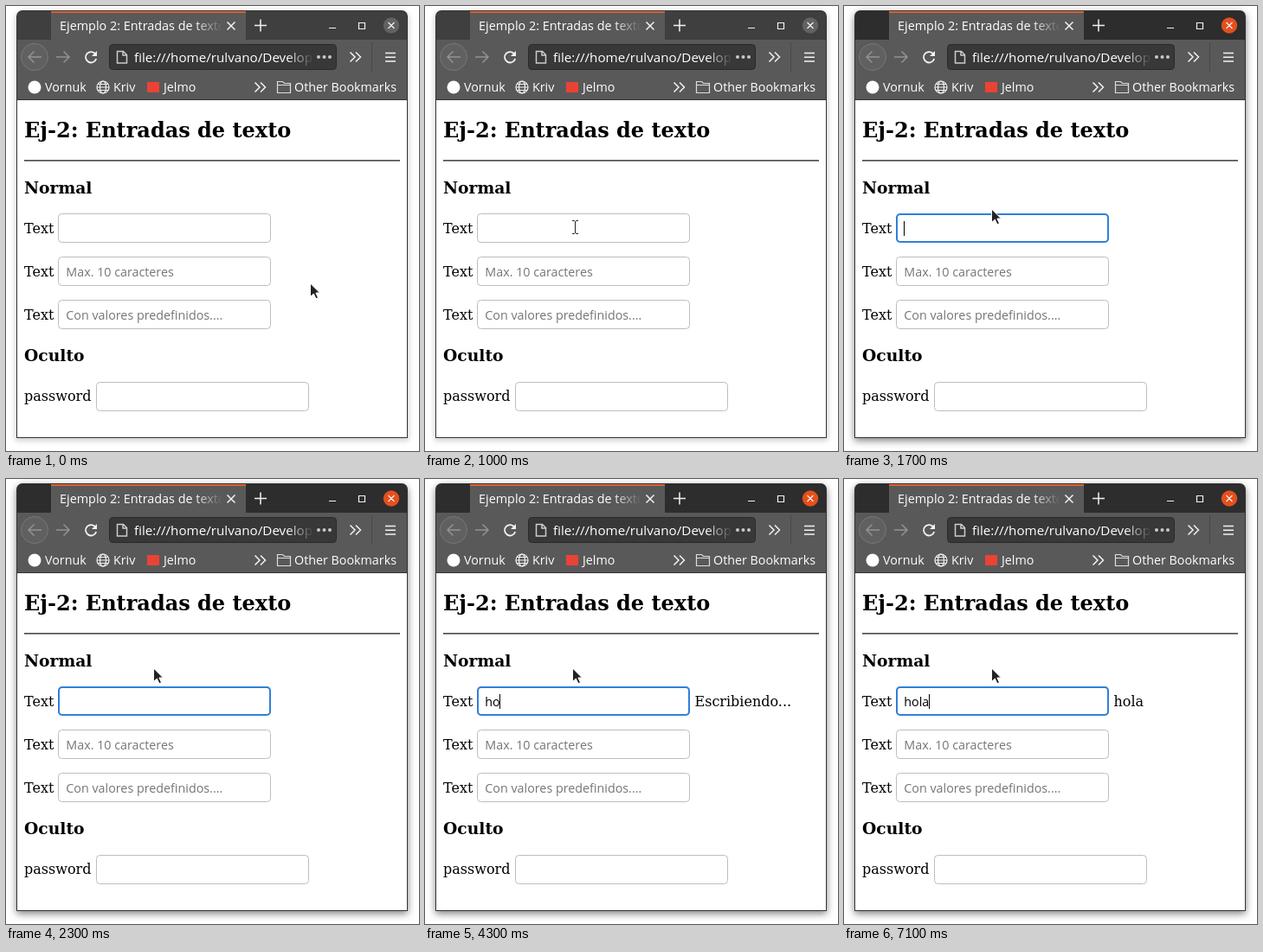
Recreate the animation shown at these times as an HTML page. Size 477 by 515 pixels, loop 8 s.

```html
<!DOCTYPE html>
<html lang="es">
<head>
<meta charset="utf-8">
<title>Entradas de texto</title>
<style>
html, body { margin: 0; width: 100%; height: 100%; overflow: hidden; background: #fff; }
#shadow { position: absolute; left: 13px; top: 6px; width: 450px; height: 493px; border-radius: 7px 7px 0 0;
  box-shadow: 0 2px 6px 2px rgba(0,0,0,.2); }
.active #shadow { box-shadow: 0 3px 9px 1px rgba(0,0,0,.5), 0 0 0 1px rgba(0,0,0,.23); }
svg { position: absolute; left: 0; top: 0; }
text { font: 14.3px "Open Sans", sans-serif; white-space: pre; }
.page text { font: 16px "DejaVu Serif", serif; }
.page .h2 { font-weight: bold; font-size: 24px; }
.page .h3 { font-weight: bold; font-size: 18.72px; }
.page .hint { font: 14.3px "Open Sans", sans-serif; fill: #757575; }
.page #typed { font: 14.3px "Open Sans", sans-serif; }
.field { fill: #fff; stroke: #bfbdbb; }
.line { fill: none; stroke: #f2f2f2; stroke-width: 1.5; }
.dim { stroke: #929292; }
.label { fill: #fff; }
#bar { fill: #3f3f3f; }
#close { fill: #626262; }
.active #bar { fill: #2d2d2d; }
.active #close { fill: #e4501d; }
</style>
</head>
<body>
<div id="shadow"></div>
<svg width="477" height="515" viewBox="0 0 477 515">
  <defs>
    <linearGradient id="tabFade" gradientUnits="userSpaceOnUse" x1="217" x2="250" y1="0" y2="0">
      <stop stop-color="#fff"/><stop offset="1" stop-color="#fff" stop-opacity="0"/>
    </linearGradient>
    <linearGradient id="urlFade" gradientUnits="userSpaceOnUse" x1="325" x2="355" y1="0" y2="0">
      <stop stop-color="#fff"/><stop offset="1" stop-color="#fff" stop-opacity="0"/>
    </linearGradient>
  </defs>

  <!-- window frame -->
  <path fill="#333" d="M12 500V12a7 7 0 0 1 7-7H457a7 7 0 0 1 7 7V500Z"/>
  <path id="bar" d="M13 39V12a6 6 0 0 1 6-6H457a6 6 0 0 1 6 6V39Z"/>
  <path fill="#595959" d="M13 39H52V6H277V39H463V108H13Z"/>
  <path fill="#d9622f" d="M52 6H277V8H52Z"/>
  <path fill="#fff" d="M13 109H463V499H13Z"/>

  <!-- tab and window buttons -->
  <text x="62" y="28" style="font-size:14.4px" fill="url(#tabFade)">Ejemplo 2: Entradas de texto</text>
  <path class="line" d="M255.5 18.5l9 9m0-9l-9 9M287 22.5h14M294 15.5v14"/>
  <circle id="close" cx="445" cy="22.5" r="9.2"/>
  <path class="line" style="stroke-width:1.2" d="M373 25.5h8M407.5 19.5h7v7h-7ZM441.5 19l7 7m0-7l-7 7"/>

  <!-- navigation -->
  <circle cx="33" cy="59" r="15.5" fill="#606060" stroke="#777"/>
  <path class="line dim" d="M41 59H26m6.5-6.5L26 59l6.5 6.5M58 59h15m-6.500-6.500L73 59l-6.500 6.500"/>
  <path class="line" style="stroke-width:1.8" d="M103.500 56A6.200 6.200 0 1 0 104.200 61"/>
  <path fill="#f2f2f2" d="M105 52v6h-6Z"/>
  <rect x="119.500" y="44.500" width="262" height="29" rx="4" fill="#383838" stroke="#2a2a2a"/>
  <path class="line" style="stroke:#ccc" d="M128.500 52.500h7l4 4v9.500h-11ZM135 53v4h4"/>
  <text x="148" y="64.500" style="font-size:15.2px" fill="url(#urlFade)">file:///home/rulvano/Develop</text>
  <g fill="#c8c8c8"><circle cx="361" cy="59" r="2"/><circle cx="367.500" cy="59" r="2"/><circle cx="374" cy="59" r="2"/></g>
  <path class="line" d="M397.500 53.500l5.500 5.500-5.500 5.500m6.500-11l5.500 5.500-5.500 5.500M438 54.500h12m-12 4.700h12m-12 4.700h12"/>
  <path stroke="#484848" d="M422.500 42V76"/>

  <!-- bookmarks -->
  <circle cx="33" cy="94" r="7.500" fill="#fff"/>
  <text class="label" x="45" y="99">Vornuk</text>
  <g class="line" style="stroke-width:1.200">
    <circle cx="112" cy="94" r="7"/><ellipse cx="112" cy="94" rx="3.500" ry="7"/>
    <path d="M105 94h14M106 90.500h12M106 97.500h12"/>
  </g>
  <text class="label" x="124" y="99">Kriv</text>
  <path fill="#ea4335" d="M163 88h14v12h-14Z"/>
  <text class="label" x="182" y="99">Jelmo</text>
  <path class="line" d="M287.500 88.500l5.500 5.500-5.500 5.500m6.500-11l5.500 5.500-5.500 5.500"/>
  <path class="line" style="stroke-width:1.200;stroke:#ddd" d="M313.500 100.500v-13h6l2 2h7v11ZM313.500 91.500h15"/>
  <text class="label" x="333" y="99">Other Bookmarks</text>

  <!-- page -->
  <g class="page">
    <text class="h2" x="21" y="152">Ej-2: Entradas de texto</text>
    <path fill="#505050" d="M21 178H455v1H21Z"/><path fill="#888" d="M21 179H455v1H21Z"/>
    <text class="h3" x="21" y="217">Normal</text>
    <text x="21" y="263">Text</text>
    <text x="21" y="313">Text</text>
    <text x="21" y="363">Text</text>
    <text class="h3" x="21" y="411">Oculto</text>
    <text x="21" y="457">password</text>
    <g id="fields"></g>
    <rect id="focus" x="61" y="241" width="244" height="32" rx="4" fill="none" stroke="#3080d8" stroke-width="2"/>
    <text class="hint" x="69.300" y="313">Max. 10 caracteres</text>
    <text class="hint" x="69.300" y="363">Con valores predefinidos....</text>
    <text id="typed" x="69.300" y="263"></text>
    <rect id="caret" y="249" width="1" height="17"/>
    <text id="status" x="311.500" y="263"></text>
  </g>

  <g id="pointer">
    <path id="arrow" fill="#222" stroke="#fff" d="M0 0V15.500L3.800 12L6.500 17.800L9 16.600L6.400 11H11Z"/>
    <g id="beam" fill="none">
      <path stroke="#fff" stroke-width="3" d="M-3.500-7.500h7M-3.500 7.500h7M0-7.500v15"/>
      <path stroke="#222" d="M-3.500-7.500h2.500l1 1 1-1h2.500M-3.500 7.500h2.500l1-1 1 1h2.500M0-7v14"/>
    </g>
  </g>
</svg>
<script>
const $ = id => document.getElementById(id);
const show = (id, on) => $(id).setAttribute("visibility", on ? "visible" : "hidden");

const LOOP = 8000, STEP = 100;
const FIELDS = [[60, 240], [60, 290], [60, 340], [104, 435]];
const PATH = [ // time, x, y
  [200, 351.5, 321], [800, 179, 265], [900, 179, 265], [1000, 173.5, 256],
  [1600, 173.5, 256], [1700, 170.5, 235], [1900, 170.5, 219]
];
const WORD = "hola", KEYS = [3200, 4300, 4800, 5300];
const CARET_OFF = [[0, 1200], [2300, 3200], [3700, 4300], [5900, 7100]];

$("fields").innerHTML = FIELDS.map(([x, y]) =>
  `<rect class="field" x="${x + .5}" y="${y + .5}" width="245" height="33" rx="4"/>`).join("");

function pointerAt(t) {
  const i = PATH.findIndex(k => k[0] > t);
  if (i === 0) return PATH[0].slice(1);
  if (i < 0) return PATH[PATH.length - 1].slice(1);
  const [a, b] = [PATH[i - 1], PATH[i]];
  const u = (t - a[0]) / (b[0] - a[0]), e = u * u * (3 - 2 * u);
  return [1, 2].map(n => a[n] + (b[n] - a[n]) * e);
}

function draw(t) {
  document.body.className = t >= 1100 ? "active" : "";
  show("focus", t >= 1200);

  const [x, y] = pointerAt(t - t % STEP);
  const inField = FIELDS.some(([l, top]) => x >= l && x < l + 246 && y >= top && y < top + 34);
  $("pointer").setAttribute("transform", `translate(${x} ${y})`);
  show("beam", inField);
  show("arrow", !inField);

  const typed = $("typed");
  typed.textContent = WORD.slice(0, KEYS.filter(k => t >= k).length);
  const width = typed.textContent ? typed.getComputedTextLength() : 0;
  $("caret").setAttribute("x", Math.floor(69.3 + width));
  show("caret", !CARET_OFF.some(([a, b]) => t >= a && t < b));
  $("status").textContent = t < KEYS[0] ? "" : t < 6400 ? "Escribiendo..." : WORD;
}

const start = performance.now();
function frame() {
  draw((performance.now() - start) % LOOP);
  requestAnimationFrame(frame);
}
frame();
</script>
</body>
</html>
```
